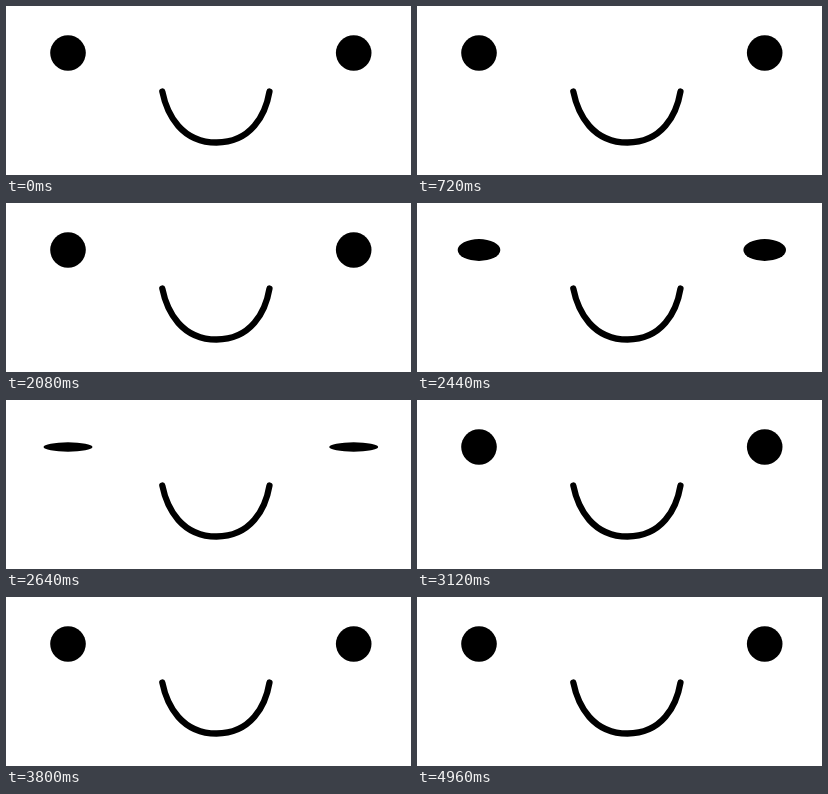
An HTML page for the animation above (5000 ms loop, 405 px wide and 169 px high).

```html
<!DOCTYPE html>
<html lang="en">
<head>
<meta charset="utf-8">
<title>Smiling face</title>
<style>
  html, body { margin: 0; width: 100%; height: 100%; overflow: hidden; background: #fff; }
  svg { display: block; width: 100vw; height: 100vh; }
</style>
</head>
<body>
<svg viewBox="0 0 405 169">
  <ellipse id="left" cx="62" cy="47" rx="17.8" ry="17.8"/>
  <ellipse id="right" cx="347.7" cy="47" rx="17.8" ry="17.8"/>
  <path d="M156.3 85.5C161 109 176 136.5 210.5 136.5S259.5 109 263.5 85.5"
        fill="none" stroke="#000" stroke-width="6.3" stroke-linecap="round"/>
</svg>
<script>
  const LOOP = 5000, BLINK = 2568, WINK = 3568, HALF = 222;
  const left = document.getElementById('left');
  const right = document.getElementById('right');

  // 0 = open, 1 = shut; eases in and out around the closing moment
  function closure(t, peak) {
    const u = Math.max(0, 1 - Math.abs(t - peak) / HALF);
    return u * u * (3 - 2 * u);
  }

  // The eye widens as it flattens
  function squash(eye, p) {
    eye.setAttribute('rx', 17.8 + 8.9 * p);
    eye.setAttribute('ry', 17.8 * (1 - p) + 0.2 * p);
  }

  function draw() {
    const t = performance.now() % LOOP;
    const blink = closure(t, BLINK);
    squash(left, blink);
    squash(right, Math.max(blink, closure(t, WINK)));
    requestAnimationFrame(draw);
  }
  draw();
</script>
</body>
</html>
```
